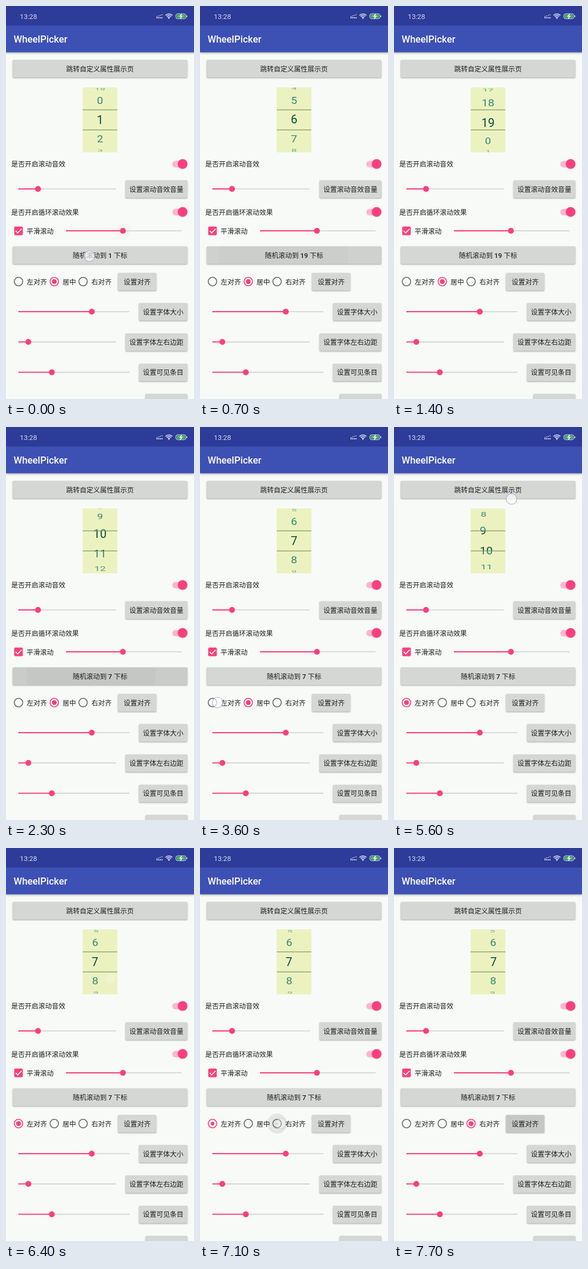
Animation of 320x666 px, one loop 8 s. Source, as an HTML page with a canvas:

```html
<!DOCTYPE html>
<html lang="zh-CN">
<head>
<meta charset="utf-8">
<title>WheelPicker</title>
<style>
html, body { margin: 0; width: 100%; height: 100%; overflow: hidden; background: #f8faf7; }
canvas { display: block; width: 320px; height: 666px; }
</style>
</head>
<body>
<canvas id="stage"></canvas>
<script>
const W = 320, H = 666, LOOP = 8000, STEP = 100, LAST = 7700;
const PINK = '#fa3f7e', INK = '#1c1e1c', GREY = '#d5d7d5', TRACK = '#d0d2d0', PAGE = '#f8faf7';
const FONT = 'Roboto, "Noto Sans CJK SC", "Noto Sans CJK", sans-serif';
const canvas = document.getElementById('stage');
const ctx = canvas.getContext('2d');
const dpr = window.devicePixelRatio || 1;
canvas.width = W * dpr;
canvas.height = H * dpr;

const clamp = (v, a = 0, b = 1) => Math.min(b, Math.max(a, v));
const ramp = (t, a, b) => clamp((t - a) / (b - a));

// Piecewise linear value through [time, value] points
function track(t, points) {
  let [t0, v0] = points[0];
  for (const [t1, v1] of points) {
    if (t < t1) return v0 + (v1 - v0) * ramp(t, t0, t1);
    t0 = t1;
    v0 = v1;
  }
  return v0;
}

// Android's default scroller curve
function viscous(u) {
  const curve = x => x < 1 ? x - 1 + Math.exp(-x) : 0.3679 + (1 - Math.exp(1 - x)) * 0.6321;
  return curve(8 * clamp(u)) / curve(8);
}

function text(str, x, y, { size = 11.5, weight = 400, color = INK, align = 'left' } = {}) {
  ctx.font = `${weight} ${size}px ${FONT}`;
  ctx.textAlign = align;
  ctx.fillStyle = color;
  ctx.fillText(str, x, y + size * 0.37);
}

function disc(x, y, r, color) {
  ctx.fillStyle = color;
  ctx.beginPath();
  ctx.arc(x, y, r, 0, 7);
  ctx.fill();
}

function circle(x, y, r, color, width) {
  ctx.strokeStyle = color;
  ctx.lineWidth = width;
  ctx.beginPath();
  ctx.arc(x, y, r, 0, 7);
  ctx.stroke();
}

function box(x, y, w, h, r, color) {
  ctx.fillStyle = color;
  ctx.beginPath();
  ctx.roundRect(x, y, w, h, r);
  ctx.fill();
}

function line(points, color, width) {
  ctx.strokeStyle = color;
  ctx.lineWidth = width;
  ctx.beginPath();
  points.forEach(([x, y]) => ctx.lineTo(x, y));
  ctx.stroke();
}

function shadowed(alpha, blur, drop, paint) {
  ctx.save();
  ctx.shadowColor = `rgba(0,0,0,${alpha})`;
  ctx.shadowBlur = blur * dpr;
  ctx.shadowOffsetY = drop * dpr;
  paint();
  ctx.restore();
}

function button(x, y, w, label, press) {
  const h = 29.6;
  shadowed(0.3, 2.2, 1.3, () => box(x, y, w, h, 1.6, GREY));
  if (press && press.alpha > 0) {
    ctx.save();
    ctx.beginPath();
    ctx.roundRect(x, y, w, h, 1.6);
    ctx.clip();
    box(x, y, w, h, 0, `rgba(0,0,0,${0.05 * press.alpha})`);
    disc(press.x, y + h / 2, press.radius, `rgba(0,0,0,${0.025 * press.alpha})`);
    ctx.restore();
  }
  text(label, x + w / 2, y + h / 2 + 0.2, { weight: 500, align: 'center' });
}

function slider(x0, x1, y, thumb) {
  line([[x0, y], [x1, y]], TRACK, 1.7);
  line([[x0, y], [thumb, y]], PINK, 1.8);
  disc(thumb, y, 5, PINK);
}

function toggle(y) {
  box(283, y - 5.5, 25, 11, 5.5, '#fbb6cf');
  shadowed(0.2, 1.5, 0.8, () => disc(300.6, y - 0.4, 8.2, PINK));
}

function radio(x, label, on, ripple) {
  if (ripple > 0) disc(x, 467, 17, `rgba(0,0,0,${0.08 * ripple})`);
  circle(x, 467, 7.2, on > 0.5 ? PINK : '#6c6e6c', 1.6);
  if (on > 0) disc(x, 467, 4.1 * on, PINK);
  text(label, x + 14, 467.3);
}

function touch(x, y, alpha, border = alpha) {
  if (alpha <= 0) return;
  disc(x, y, 9, `rgba(255,255,255,${0.65 * alpha})`);
  circle(x, y, 9, `rgba(135,145,195,${0.52 * border + 0.08 * alpha})`, 1.2);
}

function statusIcons() {
  const icon = '#dfe2f2';
  for (let i = 0; i < 4; i++) {
    box(256.3 + i * 2.8, 19, 1.7, 2, 0, icon);
    box(256.3 + i * 2.8, 17.2 - i, 1.7, 1.2, 0, icon);
  }
  ctx.strokeStyle = icon;
  ctx.lineWidth = 1.5;
  for (const r of [8, 5.2, 2.5]) {
    ctx.beginPath();
    ctx.arc(277.3, 21.4, r, -Math.PI * 0.76, -Math.PI * 0.24);
    ctx.stroke();
  }
  disc(277.3, 21, 1, icon);

  ctx.strokeStyle = icon;
  ctx.lineWidth = 1;
  ctx.beginPath();
  ctx.roundRect(289, 13.2, 17.4, 8.4, 3.4);
  ctx.stroke();
  box(290.4, 14.6, 14.6, 5.6, 2.2, '#42bd52');
  box(307.3, 15.8, 1.2, 3.2, 0.6, icon);
  line([[299, 13.5], [296.3, 17.4], [299.5, 17.4], [296.8, 21.2]], '#fff', 1.5);
}

function header() {
  shadowed(0.28, 3.5, 1.4, () => box(0, 33, W, 45.5, 0, '#3d50b4'));
  box(0, 0, W, 33, 0, '#2d3b99');
  text('13:28', 23.5, 17.8, { size: 11.8, color: '#d9dcef' });
  text('WheelPicker', 13, 56.3, { size: 16.4, weight: 500, color: '#fff' });
  statusIcons();
}

const wheel = { x: 130.5, y: 138, w: 59, h: 110, cx: 160, cy: 193.3, r: 55, angle: 0.628, count: 20, top: 176, bottom: 210 };

function digits(value, align, color) {
  const { cx, cy, r, angle, count } = wheel;
  const anchor = { left: -14.2, center: 0, right: 15 }[align];
  for (let k = Math.floor(value) - 2; k <= Math.floor(value) + 3; k++) {
    const a = (k - value) * angle;
    if (Math.abs(a) > 1.5) continue;
    const cos = Math.cos(a), sx = 171 / (171 + r * (1 - cos));
    ctx.save();
    ctx.globalAlpha = Math.min(1, 0.35 + cos);
    ctx.translate(cx, cy - 0.6 + r * Math.sin(a));
    ctx.scale(sx, cos);
    text(String((k + count) % count), anchor, -0.3, { size: 20, color, align });
    ctx.restore();
  }
}

function drawWheel(value, align) {
  const { x, y, w, h, top, bottom } = wheel;
  const bands = [[y, top - y, '#2f897c'], [top, bottom - top, '#064b42'], [bottom, y + h - bottom, '#2f897c']];
  box(x, y, w, h, 0, '#ecf2bf');
  for (const [by, bh, color] of bands) {
    ctx.save();
    ctx.beginPath();
    ctx.rect(x, by, w, bh);
    ctx.clip();
    digits(value, align, color);
    ctx.restore();
  }
  for (const ly of [top, bottom]) line([[x, ly], [x + w, ly]], '#64845a', 1);
}

const SCROLL = 1250, JUMP1 = 567, JUMP2 = 2016;
const LEFT = 3750, RIGHT = 7050, ALIGN_LEFT = 4350, ALIGN_RIGHT = 7560;

function wheelValue(t) {
  if (t < JUMP2) return 1 + 18 * viscous((t - JUMP1) / SCROLL);
  if (t < 5200) return 19 - 12 * viscous((t - JUMP2) / SCROLL);
  return track(t, [[5200, 7], [5300, 7.2], [5400, 8], [5500, 9], [5600, 9.5],
    [5700, 9.6], [5800, 9.3], [6000, 8.3], [6200, 7.3], [6320, 7]]);
}

// Press feedback that swells from x, then fades
const pressed = (t, start, x, fade) => ({
  x,
  radius: 20 + 90 * ramp(t, start, start + 400),
  alpha: ramp(t, start, start + 100) * (1 - ramp(t, start + fade * 0.5, start + fade))
});

const held = (t, from, to) => t < from ? 0 : 1 - ramp(t, to, to + 150);
const fading = (t, start) => t < start ? 0 : 1 - ramp(t, start + 100, start + 600);

function touches(t) {
  touch(142, 424, held(t, 0, 450));
  touch(145, 424, held(t, 1850, 1980));
  touch(30, 467, held(t, 3600, 3720));
  touch(222, 467, held(t, 4200, 4320));
  touch(137, 467, held(t, 6900, 7020));
  touch(222, 467, held(t, 7400, 7520));
  if (t >= 5200 && t < 6600) {
    const y = track(t, [[5200, 213], [5300, 206], [5400, 178], [5500, 140], [5600, 122],
      [5700, 118], [5800, 129], [6000, 165], [6200, 205], [6320, 222]]);
    const x = track(t, [[5200, 172], [5600, 200], [5700, 200], [6320, 177]]);
    touch(x, y, (1 - ramp(t, 6250, 6600)) ** 2, 1 - ramp(t, 6250, 6400));
  }
}

function draw(t) {
  ctx.setTransform(dpr, 0, 0, dpr, 0, 0);
  box(0, 0, W, H, 0, PAGE);
  header();
  button(11.3, 91.3, 297.5, '跳转自定义属性展示页');
  drawWheel(wheelValue(t), t < ALIGN_LEFT ? 'center' : t < ALIGN_RIGHT ? 'left' : 'right');

  text('是否开启滚动音效', 9, 268);
  toggle(268);
  slider(21, 187, 310, 54.5);
  button(203.3, 295.3, 105.5, '设置滚动音效音量');
  text('是否开启循环滚动效果', 9, 349.3);
  toggle(349.3);

  box(14, 373.8, 14.6, 14.6, 1.8, PINK);
  line([[16.5, 381], [20, 384.6], [26.4, 377.8]], '#fff', 1.6);
  text('平滑滚动', 35, 381.3);
  const halo = 1 - ramp(t, 0, 200);
  if (halo > 0) disc(199, 381, 13, `rgba(0,0,0,${0.015 * halo})`);
  slider(102, 299, 381, 199);

  const target = t < JUMP1 ? 1 : t < JUMP2 ? 19 : 7;
  const roll = t < 1850 ? pressed(t, 100, 142, 850) : pressed(t, 1900, 145, 850);
  button(11.3, 407.3, 297.5, `随机滚动到 ${target} 下标`, roll);

  const left = ramp(t, LEFT, LEFT + 200), right = ramp(t, RIGHT, RIGHT + 200);
  radio(21.3, '左对齐', left - right, fading(t, LEFT - 50));
  radio(82.2, '居中', 1 - left, 0);
  radio(131.2, '右对齐', right, fading(t, RIGHT - 50));
  const align = t < 6000 ? pressed(t, 4250, 222, 600) : pressed(t, 7450, 222, 600);
  button(190.5, 452.3, 65.5, '设置对齐', align);

  slider(21, 210, 518, 146);
  button(226.3, 503.3, 82.5, '设置字体大小');
  slider(21, 187, 569.3, 38);
  button(203.3, 554.8, 105.5, '设置字体左右边距');
  slider(21, 210, 620.7, 78);
  button(226.3, 606.2, 82.5, '设置可见条目');
  button(237.3, 657.3, 71.5, '');
  touches(t);
}

const start = performance.now();
function tick() {
  const t = (performance.now() - start) % LOOP;
  draw(Math.min(LAST, Math.floor(t / STEP) * STEP));
  requestAnimationFrame(tick);
}
tick();
</script>
</body>
</html>
```
